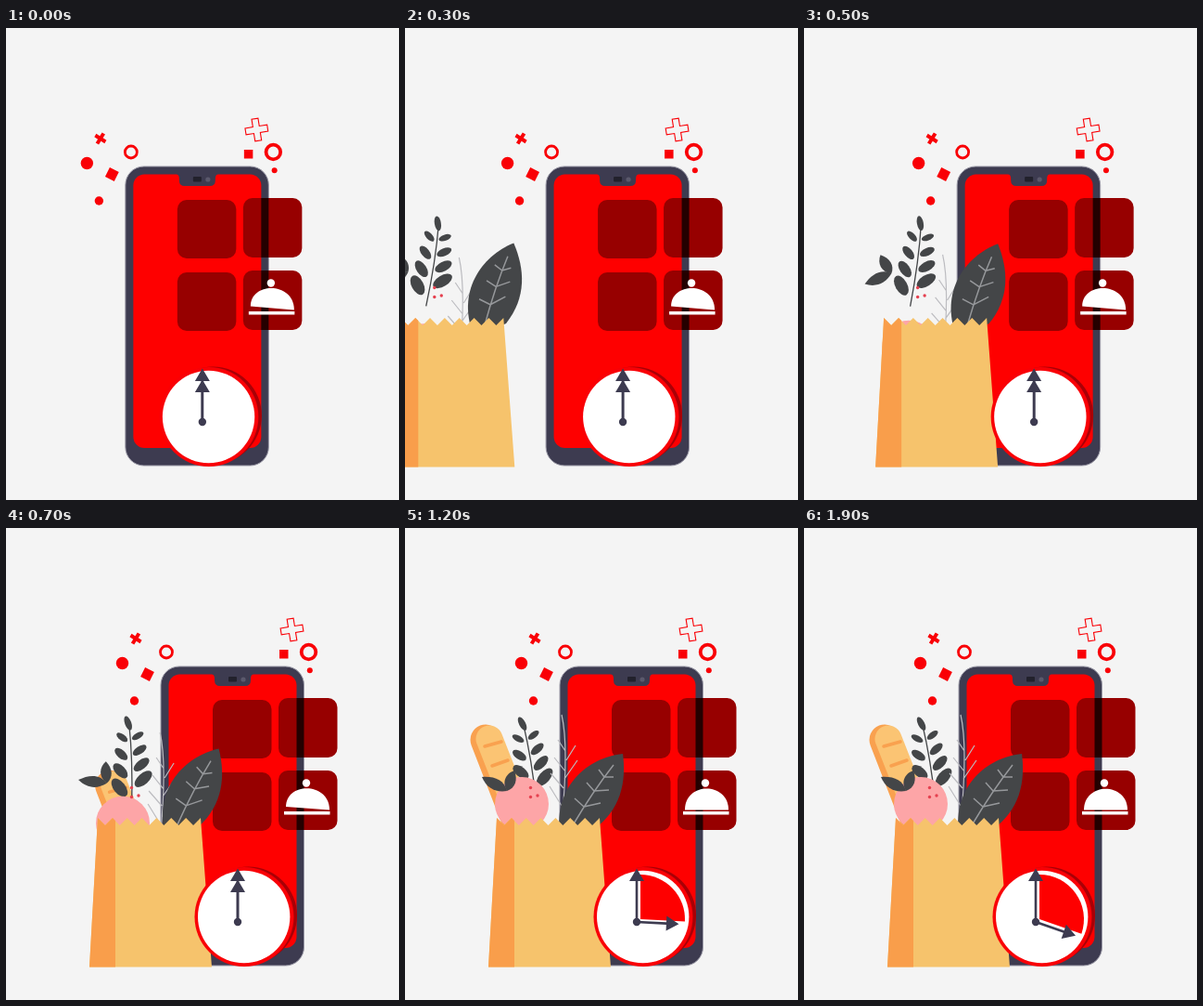
An HTML page that plays this animation: 424 by 508 pixels, repeating every 2.9 s.

```html
<!DOCTYPE html>
<html lang="en">
<head>
<meta charset="utf-8">
<title>Grocery delivery</title>
<style>
  html, body { margin: 0; width: 100%; height: 100%; overflow: hidden; background: #f4f4f4; }
  svg { display: block; width: 100%; height: 100%; }
  .red { fill: #f90006; }
  .line { fill: none; stroke: #f90006; }
  .ink { fill: #3d3b50; }
  .leaf { fill: #444648; }
  .tile { fill: #970000; }
</style>
</head>
<body>
<svg viewBox="0 0 424 508">
  <g id="phone">
    <rect x="167" y="149" width="154.500" height="322" rx="20" fill="#3d3b50" stroke="#9c9ba8"/>
    <rect x="175.500" y="157.500" width="138" height="294.500" rx="12" fill="#fe0000"/>
    <path class="ink" d="M222 157H267Q264 158 264 162V164Q264 170 258 170H231Q225 170 225 164V162Q225 158 222 157Z"/>
    <rect x="240" y="160" width="9" height="5.500" rx="1" fill="#22212c"/>
    <circle cx="256" cy="163" r="2.600" fill="#5b596c"/>
    <g class="tile">
      <rect x="223" y="185" width="63.500" height="63" rx="10"/>
      <rect x="223" y="263" width="63.500" height="63" rx="10"/>
      <rect x="294" y="183" width="63.500" height="64" rx="10"/>
      <rect x="294" y="261" width="63.500" height="64" rx="10"/>
    </g>
    <path d="M313.500 183h8v64h-8zM313.500 261h8v64h-8z" fill="#240000"/>
    <g fill="#fff">
      <circle cx="324" cy="274.500" r="4.200"/>
      <path id="dome"/>
      <rect x="300" y="305" width="49.500" height="3.500"/>
    </g>
    <g class="red">
      <path d="M-6.500-2h4.500v-4.500h4v4.500h4.500v4h-4.500v4.500h-4v-4.500h-4.500z" transform="translate(140 119) rotate(32)"/>
      <circle cx="125.500" cy="145.500" r="6.700"/>
      <rect x="-5.500" y="-5.500" width="11" height="11" transform="translate(152.500 157.500) rotate(27)"/>
      <circle cx="138.500" cy="186" r="4.700"/>
      <rect x="295" y="131" width="9.500" height="9.500"/>
      <circle cx="327.800" cy="153.300" r="3"/>
    </g>
    <g class="line">
      <circle cx="173" cy="133.500" r="6.500" stroke-width="2.800"/>
      <circle cx="326.500" cy="133.500" r="7.800" stroke-width="3.800"/>
      <path d="M-12-3.500h8.500v-8.500h7v8.500h8.500v7h-8.500v8.500h-7v-8.500h-8.500z" transform="translate(308.500 109.500) rotate(-9)" stroke-width="1.100"/>
    </g>
  </g>

  <g id="groceries">
    <g id="bread" fill="none" stroke-linecap="round">
      <path d="M87 228L122 318" stroke="#f9a14f" stroke-width="33"/>
      <path d="M91 227L126 316" stroke="#fbc473" stroke-width="29"/>
      <path d="M86 235L104 230M94 256L111 250" stroke="#f9a14f" stroke-width="3.500"/>
    </g>
    <g id="branch" class="leaf"><path d="M0-40Q3 0 0 50" fill="none" stroke="#444648" stroke-width="1.300"/></g>
    <circle id="fruit" cx="126" cy="297" r="29" fill="#fda5a7"/>
    <g id="fruitLeaves" class="leaf">
      <path d="M0 0C-12 2-22-3-27-15C-14-16-3-12 0 0Z"/>
      <path d="M0 0C-6-10-1-19 8-22C12-12 9-3 0 0Z"/>
    </g>
    <g fill="#e5404f">
      <circle cx="135.500" cy="279.500" r="1.700"/><circle cx="143" cy="288" r="1.700"/><circle cx="135.500" cy="289.500" r="1.700"/>
    </g>
    <path id="twig" fill="none" stroke="#bcbcc0" stroke-width="1.200"
      d="M169 201Q177 235 169 318M174 250L184 234M172 270L186 250M171 292L184 272M173 240L165 228M173 262L161 247M171 280L157 264M169 299L156 278"/>
    <g id="bigLeaf">
      <path class="leaf" d="M235 243C198 247 160 277 167 330L204 324C233 303 239 273 235 243Z"/>
      <path fill="none" stroke="#96989b" stroke-width="1.500"
        d="M225 255Q203 283 181 320M215 268L209 260M215 268L225 268M204 283L196 274M204 283L220 282M193 300L183 291M193 300L211 296"/>
    </g>
    <path id="bag" fill="#f6c36c"/>
    <path d="M99 312L107 320L115 312L118 315V472.500H90Z" fill="#f99e4b"/>
  </g>

  <g id="clock">
    <circle cx="261.500" cy="417" r="52.500" fill="#a90006"/>
    <circle class="red" cx="257" cy="418.500" r="53.500"/>
    <circle cx="256.700" cy="418.500" r="49.700" fill="#fff"/>
    <path id="sector" fill="#fe0000"/>
    <g class="ink" transform="translate(250 424)">
      <circle r="4.200"/>
      <path d="M-1.300 0V-44H-8L0-57.500L8-44H1.300V0Z"/>
      <path id="hand" d="M-1.300 0V-32H-8L0-45.500L8-32H1.300V0Z"/>
    </g>
  </g>
</svg>
<script>
const LOOP = 2900, STEP = 100, LAST = 1900, SWEEP = 109;
const $ = id => document.getElementById(id);
const set = (id, name, value) => $(id).setAttribute(name, value);
const move = (id, x, y = 0, extra = "") => set(id, "transform", `translate(${x} ${y}) ${extra}`);

// Symmetric ease-in-out between two times
function ease(t, start, end, power = 2) {
  const p = Math.min(1, Math.max(0, (t - start) / (end - start)));
  return p < .5 ? (2 * p) ** power / 2 : 1 - (2 - 2 * p) ** power / 2;
}

function buildBranch() {
  const add = (x, y, rx, ry, angle) => $("branch").insertAdjacentHTML("beforeend",
    `<ellipse rx="${rx}" ry="${ry}" transform="translate(${x} ${y}) rotate(${angle})"/>`);
  add(-1, -40, 8, 3.5, 72);
  for (let i = 0; i < 4; i++) {
    const y = -26 + i * 15.5, size = 7 + i * 1.5;
    add(size + 2, y, size, 3.2 + i * .9, -28 - i * 4);
    add(-size - 1, y + 1 + i * 2.5, size, 3.4 + i, 38 + i * 5);
  }
}

function buildBag() {
  const teeth = 7, width = 111 / teeth;
  let d = "M90 472.500L99 312";
  for (let i = 0; i < teeth; i++) d += `l${width / 2} 8l${width / 2} -8`;
  set("bag", "d", d + "L222 472.500Z");
}

function draw(time) {
  const t = Math.min(LAST, Math.floor(time / STEP) * STEP);
  const slide = 1 - ease(t, -100, 600, 1.9);
  const rest = 1 - ease(t, 400, 950);
  const sweep = SWEEP * ease(t, 800, 1400, 3);
  const slant = 4 * (1 - ease(t, 500, 1300));

  move("phone", -40 * slide);
  move("clock", -40 * slide);
  move("groceries", -278 * slide);

  move("bread", 62 * rest, 119 * rest);
  move("branch", 134, 250, `rotate(${-9.3 + 18 * rest})`);
  move("fruit", 0, 50 * rest);
  move("fruitLeaves", 110 - 3 * rest, 283 - 20 * rest, `rotate(${-54 * rest})`);
  move("twig", -7 * rest, 46 * rest);
  move("bigLeaf", 8 * rest, 0, `rotate(${-15.5 * rest} 182 318)`);

  set("dome", "d", `M302 ${303.5 - slant}C302 273 349 273 349 303.500Z`);
  set("hand", "transform", `rotate(${sweep})`);
  const a = sweep * Math.PI / 180;
  set("sector", "d", `M254 421V373A48 48 0 0 1 ${254 + 48 * Math.sin(a)} ${421 - 48 * Math.cos(a)}Z`);
}

buildBranch();
buildBag();
const begin = performance.now();
function tick() {
  draw((performance.now() - begin) % LOOP);
  requestAnimationFrame(tick);
}
tick();
</script>
</body>
</html>
```
